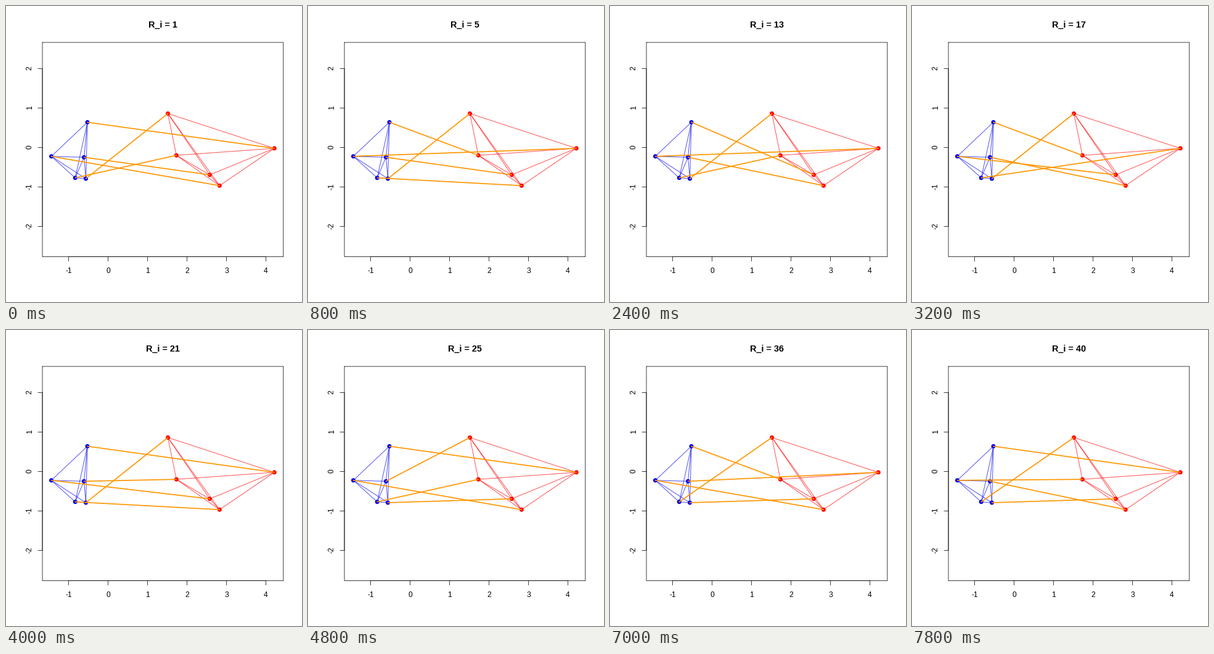
A matplotlib script for the animation above (8 s loop, 480 by 480 pixels).

```python
from itertools import combinations, islice, permutations

import matplotlib.pyplot as plt
from matplotlib.animation import FuncAnimation
from matplotlib.collections import LineCollection
from matplotlib.patches import Circle

SIZE, DPI = 480, 72
FRAMES, STEP_MS = 40, 200
UNIT, X0, Y0 = 64, 165.4, 229.4
LEFT, RIGHT, TOP, BOTTOM = 59.04, 449.76, 59.04, 406.56
TICK, DOT = 7.2, 3.5

# Stage positions in pixels; the first point of each set starts paired.
BLUE = [(129.5, 280.0), (126.5, 245.3), (132.0, 188.5), (73.5, 243.8), (112.2, 278.7)]
RED = [(262.5, 174.4), (330.3, 273.8), (435.2, 230.8), (346.3, 291.3), (276.3, 242.2)]

plt.rcParams["font.family"] = "Liberation Sans"
fig = plt.figure(figsize=(SIZE / DPI, SIZE / DPI), dpi=DPI, facecolor="white")
ax = fig.add_axes([0, 0, 1, 1])
ax.set_xlim(0, SIZE)
ax.set_ylim(SIZE, 0)
ax.axis("off")


def rule(xs, ys):
    ax.plot(xs, ys, color="black", lw=0.75, snap=False,
            solid_capstyle="round", solid_joinstyle="round")


def label(x, y, text, **style):
    return ax.text(x, y, text, ha="center", va="baseline",
                   rotation_mode="anchor", **style)


def draw_axes():
    rule([LEFT, RIGHT, RIGHT, LEFT, LEFT], [TOP, TOP, BOTTOM, BOTTOM, TOP])
    rule([X0 - UNIT, X0 + 4 * UNIT], [BOTTOM, BOTTOM])
    rule([LEFT, LEFT], [Y0 - 2 * UNIT, Y0 + 2 * UNIT])
    for v in range(-1, 5):
        x = X0 + UNIT * v
        rule([x, x], [BOTTOM, BOTTOM + TICK])
        label(x, 432.6, str(v), fontsize=12)
    for v in range(-2, 3):
        y = Y0 - UNIT * v
        rule([LEFT - TICK, LEFT], [y, y])
        label(41.8, y - 0.5, str(v), fontsize=12, rotation=90)


def draw_graph(points, color):
    ax.add_collection(LineCollection(list(combinations(points, 2)), colors=color,
                                     linewidths=1, alpha=0.68, zorder=3))
    for p in points:
        ax.add_patch(Circle(p, DOT, color=color, lw=0, zorder=4))


draw_axes()
draw_graph(BLUE, "#0000f0")
draw_graph(RED, "#ff0000")

links = LineCollection([], colors="#ff9600", linewidths=1.7, zorder=5,
                       capstyle="round")
ax.add_collection(links)
title = label(254.4, 34.3, "", fontsize=14.4, fontweight="bold")
orders = list(islice(permutations(range(5)), FRAMES))


def update(i):
    links.set_segments([(BLUE[b], RED[r]) for b, r in enumerate(orders[i])])
    title.set_text(f"R_i = {i + 1}")
    return links, title


anim = FuncAnimation(fig, update, frames=FRAMES, interval=STEP_MS,
                     init_func=lambda: update(0), repeat=True, repeat_delay=0)
plt.show()
```
